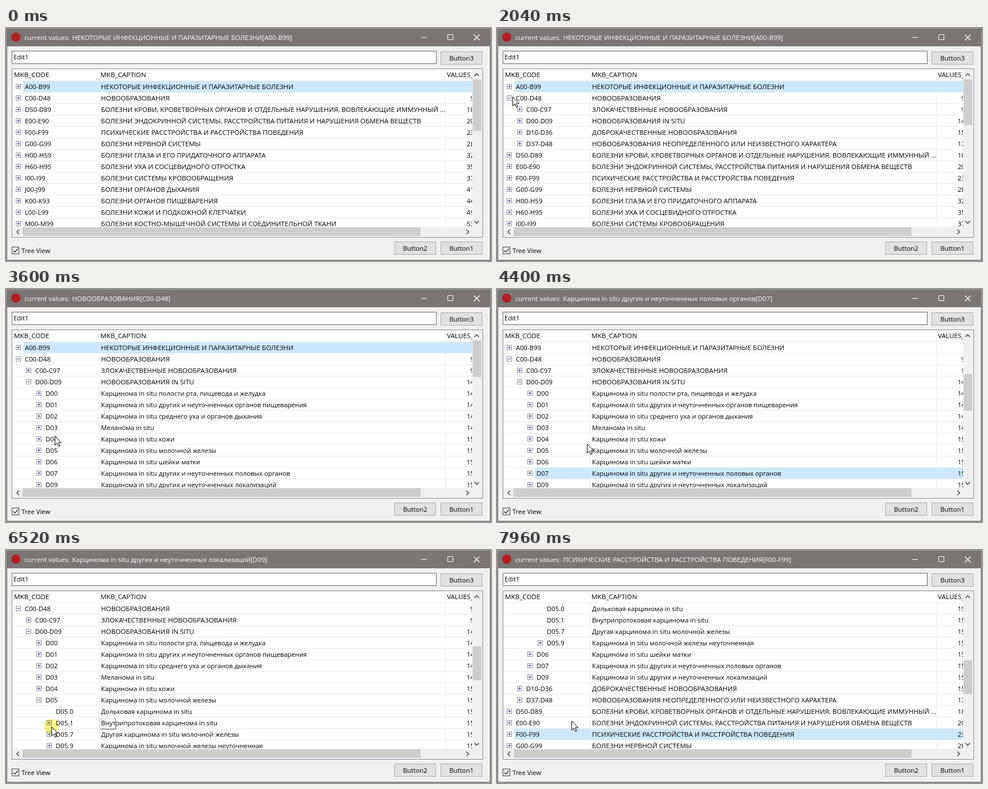
Animation, 847 px wide and 408 px high, one loop 8 s. Source, as an HTML page:

```html
<!DOCTYPE html>
<html lang="ru">
<head>
<meta charset="utf-8">
<title>Tree View</title>
<style>
  html, body { margin: 0; width: 100%; height: 100%; overflow: hidden; background: #f0f0f0; }
  svg { display: block; width: 847px; height: 408px; }
  text { font-family: "Open Sans", "Noto Sans", sans-serif; font-size: 11.3px; fill: #000; white-space: pre; }
  .caps { font-size: 11.65px; }
  .title text { fill: #fff; font-size: 11.5px; }
  .mid { text-anchor: middle; }
  .end { text-anchor: end; }
  rect, .grid { shape-rendering: crispEdges; }
  .grid { stroke: #ebebeb; fill: none; }
  .chevron { stroke: #505050; stroke-width: 1.6; fill: none; }
  .button rect { fill: #e1e1e1; stroke: #adadad; }
  .bar { fill: #f0f0f0; }
  .thumb { fill: #cdcdcd; }
</style>
</head>
<body>
<svg viewBox="0 0 847 408">
  <defs>
    <clipPath id="view"><rect x="12" y="73" width="802" height="275"/></clipPath>
  </defs>
  <rect width="847" height="408" fill="#a5a2a1"/>
  <rect x="1" y="1" width="845" height="406" fill="#6b6665"/>
  <rect x="1" y="1" width="845" height="31" fill="#7b7574"/>
  <rect x="2" y="32" width="843" height="374" fill="#f0f0f0"/>

  <g class="title">
    <circle cx="17" cy="16" r="8" fill="#b01f24"/>
    <text x="32" y="21">current values:</text>
    <text id="title" x="115.5" y="21"></text>
    <path d="M725 16.5H735M771.5 11.5H780.5V20.5H771.5Z" fill="none" stroke="#fff"/>
    <path d="M817 11.5L827 21.5M827 11.5L817 21.5" fill="none" stroke="#fff" stroke-width="1.3"/>
  </g>

  <rect x="10.5" y="40.5" width="741" height="22" fill="#fff" stroke="#6a6a6a"/>
  <text x="13" y="55">Edit1</text>
  <g id="buttons"></g>

  <rect x="10.5" y="71.5" width="822" height="295" fill="#fff" stroke="#828790"/>
  <g clip-path="url(#view)">
    <path id="lines" class="grid"/>
    <text class="caps" x="14" y="86">MKB_CODE</text>
    <text class="caps" x="165" y="86">MKB_CAPTION</text>
    <text class="caps" x="770" y="86">VALUES_</text>
    <g id="rows"></g>
    <g id="hint">
      <rect x="163.5" y="295.5" width="27" height="17" fill="none" stroke="#d8d8d8"/>
      <path d="M191.5 296V313.5H164" fill="none" stroke="#858585"/>
      <path d="M192.5 299V314.5H167" fill="none" stroke="#c4c4c4"/>
    </g>
  </g>

  <rect class="bar" x="814" y="73" width="17" height="292"/>
  <rect class="bar" x="12" y="348" width="819" height="17"/>
  <rect class="thumb" x="29" y="349" width="695" height="15"/>
  <rect class="thumb" id="thumb" x="815" width="15"/>
  <path class="chevron" d="M818 84L822 80 826 84M818 338L822 342 826 338M23 353L19 357 23 361M804 353L808 357 804 361"/>

  <rect x="10.5" y="383.5" width="12" height="12" fill="#fff" stroke="#333"/>
  <path d="M12.8 389.5L15.6 392.5 20.8 386.3" fill="none" stroke="#222" stroke-width="1.4"/>
  <text x="27" y="394">Tree View</text>

  <circle id="click" r="13" fill="#fdf05a" style="mix-blend-mode:multiply"/>
  <path id="cursor" d="M.5 .5V16.5L4.2 13 6.8 18.7 9.2 17.7 6.7 12.1H11.6Z" fill="#fff" stroke="#000"/>
</svg>
<script>
const LOOP = 8000, TICK = 40;
const $ = id => document.getElementById(id);

const row = (level, code, caption, value, times = {}) =>
  ({ level, code, caption, value, from: 0, open: Infinity, leaf: Infinity, ...times });
const inSitu = (code, rest, value, times) =>
  row(2, code, 'Карцинома in situ ' + rest, value, { from: 2960, ...times });
const breast = (code, caption, leaf = Infinity) => row(3, code, caption, 15, { from: 5240, leaf });

const tree = [
  row(0, 'A00-B99', 'НЕКОТОРЫЕ ИНФЕКЦИОННЫЕ И ПАРАЗИТАРНЫЕ БОЛЕЗНИ', ''),
  row(0, 'C00-D48', 'НОВООБРАЗОВАНИЯ', 9, { open: 1960 }),
  row(1, 'C00-C97', 'ЗЛОКАЧЕСТВЕННЫЕ НОВООБРАЗОВАНИЯ', 9, { from: 1960 }),
  row(1, 'D00-D09', 'НОВООБРАЗОВАНИЯ IN SITU', 14, { from: 1960, open: 2960 }),
  inSitu('D00', 'полости рта, пищевода и желудка', 14),
  inSitu('D01', 'других и неуточненных органов пищеварения', 14),
  inSitu('D02', 'среднего уха и органов дыхания', 14),
  row(2, 'D03', 'Меланома in situ', 14, { from: 2960 }),
  inSitu('D04', 'кожи', 15),
  inSitu('D05', 'молочной железы', 15, { open: 5240 }),
  breast('D05.0', 'Дольковая карцинома in situ', 6280),
  breast('D05.1', 'Внутрипротоковая карцинома in situ', 6560),
  breast('D05.7', 'Другая карцинома in situ молочной железы', 7080),
  breast('D05.9', 'Карцинома in situ молочной железы неуточненная'),
  inSitu('D06', 'шейки матки', 15),
  inSitu('D07', 'других и неуточненных половых органов', 15),
  inSitu('D09', 'других и неуточненных локализаций', 15),
  row(1, 'D10-D36', 'ДОБРОКАЧЕСТВЕННЫЕ НОВООБРАЗОВАНИЯ', 15, { from: 1960 }),
  row(1, 'D37-D48', 'НОВООБРАЗОВАНИЯ НЕОПРЕДЕЛЕННОГО ИЛИ НЕИЗВЕСТНОГО ХАРАКТЕРА', 17, { from: 1960 }),
  row(0, 'D50-D89', 'БОЛЕЗНИ КРОВИ, КРОВЕТВОРНЫХ ОРГАНОВ И ОТДЕЛЬНЫЕ НАРУШЕНИЯ, ВОВЛЕКАЮЩИЕ ИММУННЫЙ ...', 18),
  row(0, 'E00-E90', 'БОЛЕЗНИ ЭНДОКРИННОЙ СИСТЕМЫ, РАССТРОЙСТВА ПИТАНИЯ И НАРУШЕНИЯ ОБМЕНА ВЕЩЕСТВ', 20),
  row(0, 'F00-F99', 'ПСИХИЧЕСКИЕ РАССТРОЙСТВА И РАССТРОЙСТВА ПОВЕДЕНИЯ', 23),
  row(0, 'G00-G99', 'БОЛЕЗНИ НЕРВНОЙ СИСТЕМЫ', 28),
  row(0, 'H00-H59', 'БОЛЕЗНИ ГЛАЗА И ЕГО ПРИДАТОЧНОГО АППАРАТА', 32),
  row(0, 'H60-H95', 'БОЛЕЗНИ УХА И СОСЦЕВИДНОГО ОТРОСТКА', 35),
  row(0, 'I00-I99', 'БОЛЕЗНИ СИСТЕМЫ КРОВООБРАЩЕНИЯ', 37),
  row(0, 'J00-J99', 'БОЛЕЗНИ ОРГАНОВ ДЫХАНИЯ', 41),
  row(0, 'K00-K93', 'БОЛЕЗНИ ОРГАНОВ ПИЩЕВАРЕНИЯ', 44),
  row(0, 'L00-L99', 'БОЛЕЗНИ КОЖИ И ПОДКОЖНОЙ КЛЕТЧАТКИ', 49),
  row(0, 'M00-M99', 'БОЛЕЗНИ КОСТНО-МЫШЕЧНОЙ СИСТЕМЫ И СОЕДИНИТЕЛЬНОЙ ТКАНИ', 53)
];
const HIDDEN_BELOW = 8;   // chapters after the last listed one
const PAGE = 12, TRACK = 241;
const walk = tree.filter(r => r.level < 3);

// The title briefly follows a node other than the selected one.
const peeks = [[2880, 3200, 'D00-D09'], [3600, 3680, 'C00-D48'], [5080, 5480, 'D05'], [7040, 7280, 'D05.7']];

const clicks = [1880, 2880, 5080, 6240, 6420, 7000];

// time, x, y of the pointer tip
const path = [
  [520, 404, 396], [880, 173, 163], [1120, 173, 163], [1880, 27, 124], [1960, 27, 121],
  [2040, 27, 120], [2760, 42, 163], [3400, 42, 163], [3600, 85, 257], [3880, 85, 257],
  [4400, 157, 271], [4680, 112, 266], [4880, 60, 262], [5240, 60, 262], [5560, 68, 268],
  [6040, 68, 268], [6200, 79, 287], [6280, 79, 288], [6440, 79, 309], [6560, 79, 309],
  [6800, 79, 317], [6960, 78, 325], [7160, 78, 327], [7520, 130, 299]
];

function pointerAt(t) {
  const next = path.findIndex(p => p[0] > t);
  if (next < 0) return path[path.length - 1].slice(1);
  const [t0, x0, y0] = path[next - 1], [t1, x1, y1] = path[next];
  const u = (t - t0) / (t1 - t0), k = u * u * (3 - 2 * u);
  return [x0 + (x1 - x0) * k, y0 + (y1 - y0) * k];
}

// How often the Down key has moved the selection.
function stepsAt(t) {
  if (t < 3680) return 0;
  if (t < 3880) return 1;
  if (t < 7760) return Math.min(12, 2 + Math.floor((t - 3880) / 57));
  return 13 + Math.floor((t - 7760) / 50);
}

const capsClass = s => s === s.toUpperCase() ? 'caps' : '';

function rowMarkup(r, i, t, selected) {
  const y = 93 + 20 * i, shift = 18 * r.level, x = 17.5 + shift;
  const highlight = r === selected
    ? `<rect x="${30 + shift}" y="${y}" width="${784 - shift}" height="19" fill="#cce8ff"/>` : '';
  const sign = t < r.open ? `M${x + 4} ${y + 7}v5` : '';
  const icon = t < r.leaf
    ? `<rect x="${x}" y="${y + 5.5}" width="8" height="8" rx="1" fill="#f8f8f8" stroke="#959595"/>
       <path d="M${x + 1.5} ${y + 9.5}h5${sign}" stroke="#3c4f91" shape-rendering="crispEdges"/>` : '';
  return `${highlight}${icon}
    <text x="${33 + shift}" y="${y + 14}">${r.code}</text>
    <text class="${capsClass(r.caption)}" x="166" y="${y + 14}">${r.caption}</text>
    <text class="end" x="817.5" y="${y + 14}">${r.value}</text>`;
}

function draw(t) {
  const rows = tree.filter(r => t >= r.from);
  const steps = stepsAt(t), selected = walk[steps], index = rows.indexOf(selected);
  const top = steps <= 12 ? Math.max(0, steps - 11) : index - 11;
  $('rows').innerHTML = rows.slice(top, top + 13).map((r, i) => rowMarkup(r, i, t, selected)).join('');

  const peek = peeks.find(([a, b]) => t >= a && t < b);
  const current = peek ? tree.find(r => r.code === peek[2]) : selected;
  $('title').textContent = `${current.caption}[${current.code}]`;

  const unit = TRACK / (rows.length + HIDDEN_BELOW + PAGE - 1);
  $('thumb').setAttribute('y', Math.round(90 + unit * index));
  $('thumb').setAttribute('height', Math.round(unit * PAGE));

  const shown = t >= path[0][0];
  $('cursor').style.display = shown ? '' : 'none';
  const [x, y] = shown ? pointerAt(t).map(Math.round) : [0, 0];
  $('cursor').setAttribute('transform', `translate(${x} ${y})`);
  $('click').setAttribute('transform', `translate(${x} ${y})`);
  const age = Math.min(...clicks.filter(c => c <= t).map(c => t - c));
  $('click').style.opacity = age < 160 ? Math.min(1, (160 - age) / 80) : 0;
  $('hint').style.display = t >= 6440 && t < 6600 ? '' : 'none';
}

$('buttons').innerHTML = [['Button3', 759, 41], ['Button2', 678, 374], ['Button1', 759, 374]]
  .map(([label, x, y]) => `<g class="button"><rect x="${x + .5}" y="${y + .5}" width="72" height="22"/>
    <text class="mid" x="${x + 36.5}" y="${y + 16}">${label}</text></g>`).join('');
$('lines').setAttribute('d', 'M162.5 72V348M767.5 72V348' +
  Array.from({ length: 13 }, (_, i) => `M11 ${92.5 + 20 * i}H815`).join(''));

const start = performance.now();
let last = -1;
function frame() {
  const t = Math.floor(((performance.now() - start) % LOOP) / TICK) * TICK;
  if (t !== last) draw(last = t);
  requestAnimationFrame(frame);
}
frame();
</script>
</body>
</html>
```
